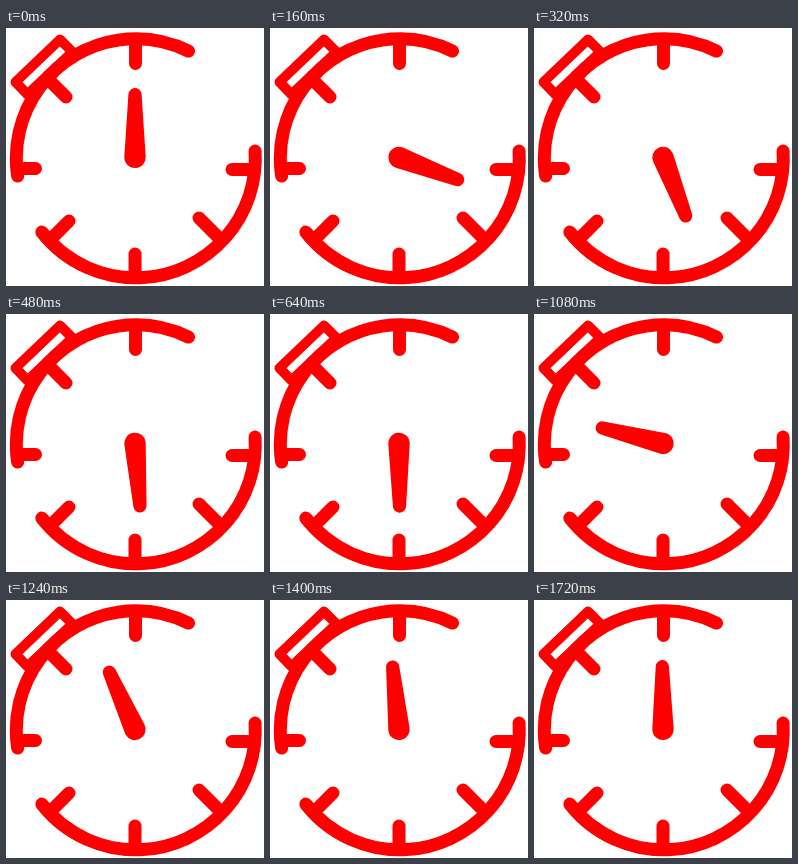
An HTML page with a canvas for the animation above (1960 ms loop, 258 by 258 pixels).

```html
<!DOCTYPE html>
<html lang="en">
<head>
<meta charset="utf-8">
<title>Stopwatch</title>
<style>
  html, body { margin: 0; width: 100%; height: 100%; overflow: hidden; background: #fff; }
  canvas { display: block; width: 258px; height: 258px; }
</style>
</head>
<body>
<canvas id="stage" width="258" height="258"></canvas>
<script>
const ctx = document.getElementById('stage').getContext('2d');
const SIZE = 258, RED = '#f00';
const LOOP = 1960, STEP = 40, SWING = 920, SECOND_START = 933;
const dial = { x: 129.8, y: 130.3, r: 119.5 };
const hand = { x: 129, y: 129.4, length: 62.7, tip: 6.6, hub: 10.7 };

const ticks = [
  [129.5, 12, 129.5, 35.5],
  [129, 226, 129, 249],
  [12, 140.5, 29.5, 140.5],
  [226, 141.5, 248, 141.5],
  [43, 52, 60, 69],
  [63, 193, 45, 211],
  [193, 190, 213, 210]
];
const crown = [[54, 11.5], [9.5, 54], [21.5, 66.5], [66.5, 24]];

function strokePath(width, build) {
  ctx.lineWidth = width;
  ctx.beginPath();
  build();
  ctx.stroke();
}

function ringArc(x1, y1, x2, y2) {
  const angle = (x, y) => Math.atan2(y - dial.y, x - dial.x);
  strokePath(13, () => ctx.arc(dial.x, dial.y, dial.r, angle(x1, y1), angle(x2, y2)));
}

function drawCase() {
  ringArc(12, 148, 183, 22);
  ringArc(249, 123, 36, 204);
  for (const [x1, y1, x2, y2] of ticks) {
    strokePath(13, () => { ctx.moveTo(x1, y1); ctx.lineTo(x2, y2); });
  }
  strokePath(10, () => {
    crown.forEach(([x, y]) => ctx.lineTo(x, y));
    ctx.closePath();
  });
}

function drawHand(degrees) {
  const taper = Math.asin((hand.hub - hand.tip) / hand.length);
  ctx.save();
  ctx.translate(hand.x, hand.y);
  ctx.rotate(degrees * Math.PI / 180);
  ctx.beginPath();
  ctx.arc(0, -hand.length, hand.tip, Math.PI + taper, -taper);
  ctx.arc(0, 0, hand.hub, -taper, Math.PI + taper);
  ctx.closePath();
  ctx.fill();
  ctx.restore();
}

// Quintic ease-out, clamped to 0..1
function swing(elapsed) {
  const p = Math.min(1, Math.max(0, elapsed / SWING));
  return 1 - (1 - p) ** 5;
}

function handAngle(t) {
  return 180 * swing(t) + 179.4 * swing(t - SECOND_START);
}

function render(now) {
  const t = Math.floor((now % LOOP) / STEP) * STEP;
  ctx.fillStyle = '#fff';
  ctx.fillRect(0, 0, SIZE, SIZE);
  ctx.fillStyle = ctx.strokeStyle = RED;
  ctx.lineCap = ctx.lineJoin = 'round';
  drawCase();
  drawHand(handAngle(t));
}

const start = performance.now();
function tick() {
  render(performance.now() - start);
  requestAnimationFrame(tick);
}
tick();
</script>
</body>
</html>
```
